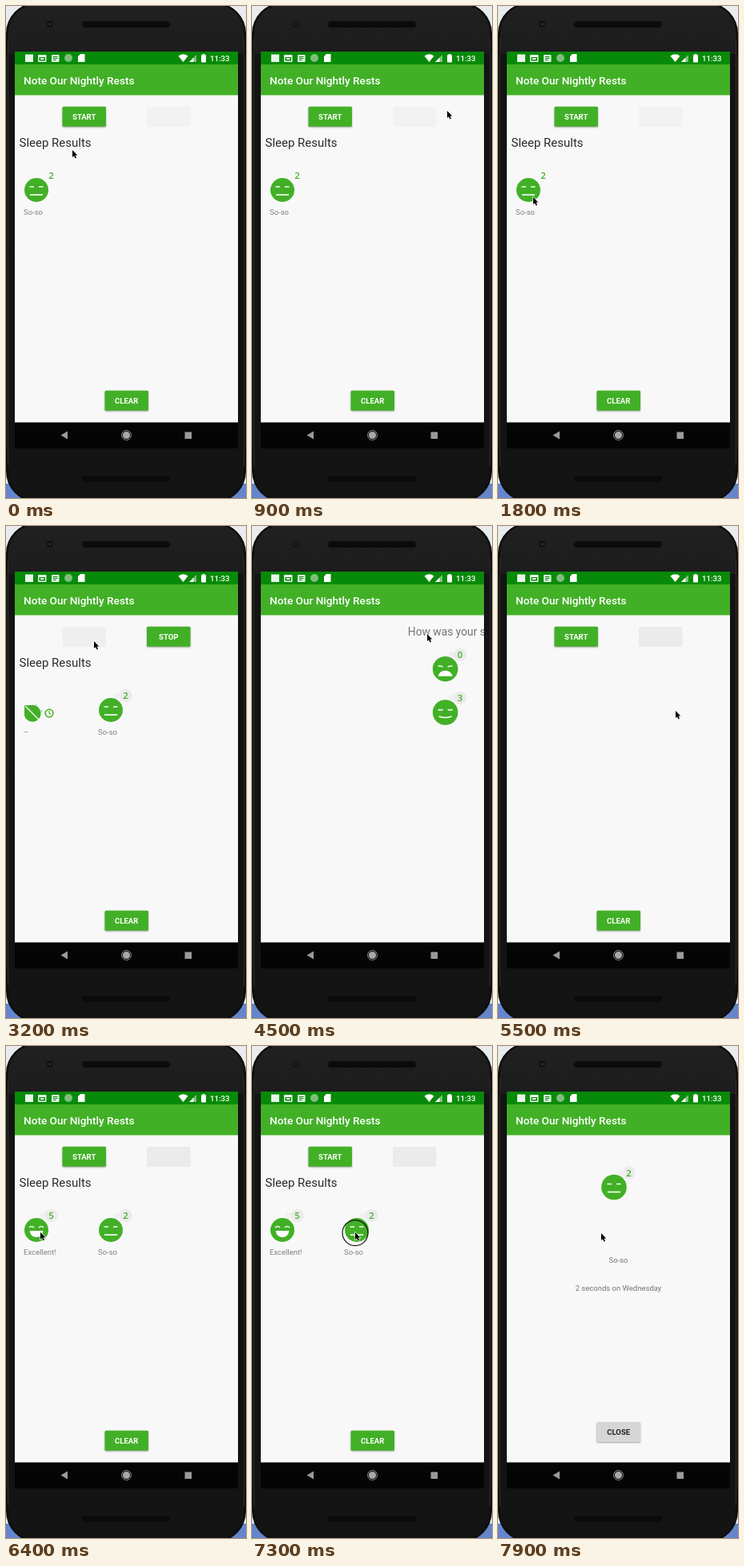
These frames come from a looping animation (300 px wide and 615 px high, 8 s). An HTML page with a canvas:

```html
<!DOCTYPE html>
<html lang="en">
<head>
<meta charset="utf-8">
<title>Sleep log demo</title>
<style>
html, body { margin: 0; width: 100%; height: 100%; overflow: hidden; background: #e9ecee; }
canvas { display: block; }
</style>
</head>
<body>
<canvas id="stage" width="300" height="615"></canvas>
<script>
const g = document.getElementById('stage').getContext('2d');
const LOOP = 8000, GREEN = '#42b027', PAPER = '#f8f8f8', BADGE = '#ebebeb';

// Pointer path: time, x, y
const PATH = [
  [0, 83, 180], [220, 39, 172], [500, 98, 136], [900, 244, 131], [1020, 244, 131],
  [1500, 62, 261], [1800, 44, 239], [1920, 44, 239], [2200, 62, 92], [2420, 99, 138],
  [2750, 102, 140], [3200, 110, 144], [3560, 142, 290], [3700, 150, 280], [4080, 216, 134],
  [4500, 219, 135], [4700, 215, 145], [5050, 222, 231], [5550, 222, 231], [6250, 60, 215],
  [6500, 34, 242], [6850, 78, 96], [7180, 129, 233], [8000, 129, 234]
];
const CLICKS = [[2460, 2620], [4180, 4340], [5230, 5390], [7200, 7380]];

const clamp = v => Math.max(0, Math.min(1, v));
const smooth = v => v * v * (3 - 2 * v);
const ramp = (t, start, length) => smooth(clamp((t - start) / length));
const slideX = (t, start) => 280 * (0.5 + Math.cos(Math.PI * clamp((t - start) / 300)) / 2);

function box(x, y, w, h, color, r = 0) {
  g.fillStyle = color;
  g.beginPath();
  g.roundRect(x, y, w, h, r);
  g.fill();
}

function disc(x, y, r, color) {
  g.fillStyle = color;
  g.beginPath();
  g.arc(x, y, r, 0, 7);
  g.fill();
}

function ring(x, y, r, color, width) {
  g.strokeStyle = color;
  g.lineWidth = width;
  g.beginPath();
  g.arc(x, y, r, 0, 7);
  g.stroke();
}

function shape(d, color) {
  g.fillStyle = color;
  g.fill(new Path2D(d));
}

function line(d, color, width) {
  g.strokeStyle = color;
  g.lineWidth = width;
  g.stroke(new Path2D(d));
}

function text(s, x, y, size, color, weight = 400, align = 'left', font = 'Roboto') {
  g.font = `${weight} ${size}px ${font}, sans-serif`;
  g.textAlign = align;
  g.fillStyle = color;
  g.fillText(s, x, y);
}

function at(x, y, draw) {
  g.save();
  g.translate(x, y);
  draw();
  g.restore();
}

function button(label, x, y, color = GREEN, ink = '#fff') {
  g.save();
  g.shadowColor = 'rgba(0,0,0,.35)';
  g.shadowBlur = 2;
  g.shadowOffsetY = 1;
  box(x, y, 54.5, 25, color, 1.5);
  g.restore();
  text(label, x + 27.2, y + 16.2, 9.5, ink, 700, 'center');
}

const EYES = [
  'M-9-3.500Q-6-4-3-2.500M9-3.500Q6-4 3-2.500', 'M-8-4H-3M3-4H8', 'M-8.500-4H-3M3-4H8.500',
  'M-9-3.500Q-6-2.500-3-3.500M3-3.500Q6-2.500 9-3.500',
  'M-9-3Q-6-6-3-3M3-3Q6-6 9-3', 'M-9-3Q-6-6-3-3M3-3Q6-6 9-3'
];
const MOUTHS = [
  'M-9 9Q-7 2 0 2Q7 2 9 9Z', 'M-7 8Q0 3 7 8', 'M-8 6H8',
  'M-8 5Q0 8 8 5', 'M-8 4Q0 11 8 4', 'M-8.500 1H8.500Q7 9 0 9Q-7 9-8.500 1Z'
];

function face(score, x, y, badge = true, r = 15.8) {
  at(x, y, () => {
    if (badge) {
      disc(8, -18, 4, '#f0f0f0');
      disc(18.5, -18, 8, BADGE);
    }
    disc(0, 0, r, GREEN);
    line(EYES[score], '#f4faf2', 1.4);
    if (score % 5) line(MOUTHS[score], '#f4faf2', 1.7);
    else shape(MOUTHS[score], '#fff');
    text(score, 18.5, -13.8, 11.5, GREEN, 600, 'center', 'Open Sans');
  });
}

function sleepingItem() {
  shape('M23 224H31A10.5 10.5 0 1 1 23 237Z', GREEN);
  line('M24 225L43 244', PAPER, 1.3);
  line('M37 223L39 225M43 230L46 232', '#8aca7b', 1);
  ring(54, 234, 4.8, GREEN, 1.6);
  line('M54 231V234L56 235.5', GREEN, 1.2);
  text('--', 22, 260, 9.5, '#757575');
}

function item(score, label, x, badge) {
  face(score, 38 + x, 230, badge, 15);
  text(label, 22 + x, 260.5, 9.5, '#808080');
}

function tracker(t) {
  const running = t >= 2550 && t < 4300;
  const ghost = t < 2550 ? '#f2f2f2' : '#ebebeb';
  if (running) box(70.5, 126, 54.5, 25, '#efefef', 2);
  else button('START', 70.5, 125.8);
  if (running) button('STOP', 176, 125.8);
  else box(176, 126, 54.5, 25, ghost, 2);
  button('CLEAR', 123.5, 480.8);
  if (t >= 5450 && t < 5560) return;

  text('Sleep Results', 16.5, 176, 15, '#2b2b2b');
  const added = t >= 5560;
  item(2, 'So-so', added ? 93 : 93 * ramp(t, 2600, 250), t > 2600);
  if (added) {
    item(5, 'Excellent!', 0, true);
  } else if (t > 2820) {
    g.globalAlpha = clamp((t - 2820) / 120);
    sleepingItem();
    g.globalAlpha = 1;
  }
}

function quality() {
  text('How was your sleep?', 17.2, 136.5, 13.8, '#757575');
  for (let i = 0; i < 6; i++) face(i, 64 + 81 * (i % 3), i < 3 ? 178.7 : 233);
}

function detail() {
  face(2, 145, 176.5);
  text('So-so', 150.5, 271, 9.5, '#757575', 400, 'center');
  text('2 seconds on Wednesday', 150.5, 306, 9.5, '#757575', 400, 'center');
  button('CLOSE', 123.5, 470, '#d6d6d6', '#222');
}

function phone() {
  box(0, 0, 300, 597, '#e9ecee');
  box(0, 597, 300, 18, '#6484cc');
  const body = g.createLinearGradient(0, 0, 0, 615);
  body.addColorStop(0, '#202020');
  body.addColorStop(0.1, '#1c1c1c');
  body.addColorStop(1, '#131313');
  box(0, -4, 300, 624, '#0c0c0c', 38);
  box(2.5, -2, 295, 620, body, 36);
  box(0, 60, 11, 495, '#131313');
  box(290, 60, 10, 495, '#131313');
  line('M2.5 40V575M297.5 40V575', '#2e2e2e', 1);
  for (const y of [19, 587]) box(95, y, 110, 8, '#0b0b0b', 4);
  disc(55, 22.5, 4, '#121212');
  disc(55, 22.5, 1.6, '#29313a');
}

function statusBar() {
  box(11, 57, 279, 16.5, '#078a09');
  box(24, 60.5, 10, 9.5, '#e8f4e8');
  box(40, 61, 10.5, 9, '#e8f4e8', 1);
  box(41.5, 64, 7.5, 4.5, '#078a09');
  box(43, 65, 4.5, 2, '#e8f4e8');
  box(57, 61, 9.5, 9, '#e8f4e8', 1);
  line('M59 63.5H64.5M59 65.5H64.5M59 67.5H62.5', '#078a09', 1);
  disc(78, 65, 5, '#7fbd80');
  shape('M93 60H98.500V70H90V63Z', '#fff');
  shape('M215.500 62.500Q221.500 58 227.500 62.500L221.500 70Z', '#fff');
  shape('M229 70L238 61V70Z', '#7cc07d');
  shape('M229 70L234.500 64.500V70Z', '#fff');
  box(244, 61, 6, 9.5, '#fff', 1);
  box(245.5, 60, 3, 2, '#fff');
  text('11:33', 255, 69, 9.6, '#fff', 500);
}

function chrome() {
  statusBar();
  box(11, 73, 279, 38.5, GREEN);
  text('Note Our Nightly Rests', 22, 97.5, 13.6, '#fff', 500);
  box(11, 520.5, 279, 32.5, '#050505');
  shape('M68.500 536.500L77 531.500V541.500Z', '#9b9b9b');
  disc(150.5, 536.5, 4.6, '#a8a8a8');
  ring(150.5, 536.5, 6, '#8e8e8e', 1);
  box(223.5, 532.5, 8.5, 8.5, '#9b9b9b');
}

function pointer(t) {
  const i = PATH.findIndex(p => p[0] > t);
  const [a, b] = [PATH[i - 1], PATH[i]];
  const k = ramp(t, a[0], b[0] - a[0]);
  at(a[1] + (b[1] - a[1]) * k, a[2] + (b[2] - a[2]) * k, () => {
    if (CLICKS.some(c => t >= c[0] && t < c[1])) ring(0, 0.5, 16, '#111', 1.2);
    const arrow = 'M0 0V9L2 7.200L3.500 10.500L5 9.800L3.600 6.500H6.300Z';
    line(arrow, '#fff', 1.2);
    shape(arrow, '#000');
  });
}

function draw(t) {
  phone();
  box(11, 57, 279, 496, PAPER);
  g.save();
  g.beginPath();
  g.rect(11, 111, 279, 410);
  g.clip();
  if (t >= 7480) at(slideX(t, 7480), 0, detail);
  else if (t >= 4380 && t < 5450) at(slideX(t, 4377), 0, quality);
  else tracker(t);
  g.restore();
  chrome();
  pointer(t);
}

const start = performance.now();
function tick() {
  draw((performance.now() - start) % LOOP);
  requestAnimationFrame(tick);
}
tick();
</script>
</body>
</html>
```
